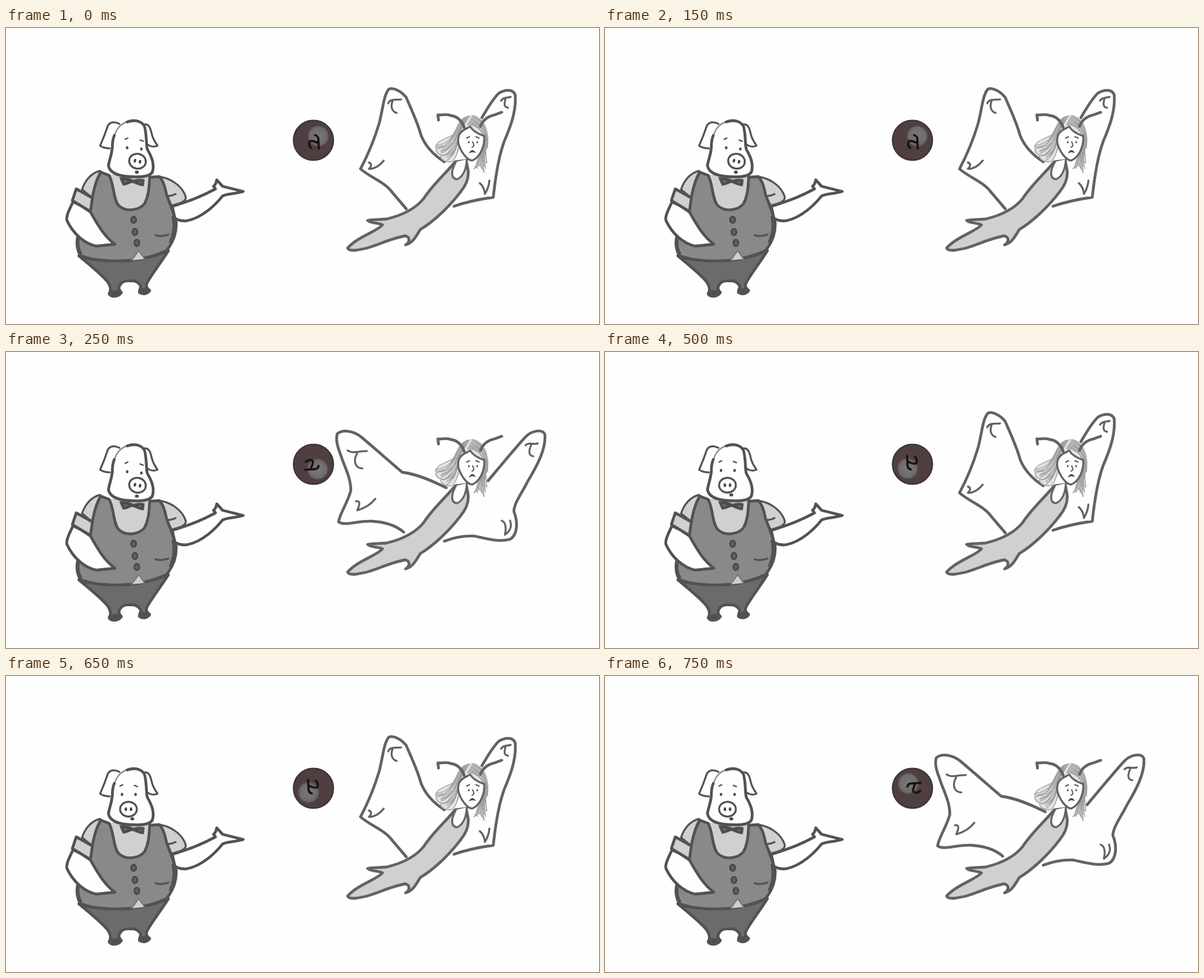
These frames come from a looping animation (920x460 px, 1000 ms). An HTML page:

```html
<!DOCTYPE html>
<html lang="en">
<head>
<meta charset="utf-8">
<title>Pig, ball and fairy</title>
<style>
  html, body { margin: 0; width: 100%; height: 100%; overflow: hidden; background: #fefefe; }
  svg { display: block; width: 920px; height: 460px; }
  path, ellipse, circle { stroke-linecap: round; stroke-linejoin: round; }
  .ink { fill: none; stroke: #535154; stroke-width: 4.3; }
  .white { fill: #fefefe; }
  .light { fill: #d0d0d0; }
  .vest { fill: #8b8988; }
  .dark { fill: #6c6b6c; }
  .solid { fill: #4b494b; }
  .mid { stroke-width: 3; }
  .thin { stroke-width: 2; }
  .fairy .ink { stroke: #636163; }
  .hair { fill: none; stroke: #a0a0a0; stroke-width: 1.3; }
</style>
</head>
<body>
<svg viewBox="0 0 920 460">
  <g id="pig" class="ink">
    <path class="dark" d="M113 354C126 365 150 384 158 395C164 404 162 410 160 413C163 419 175 418 179 411C176 408 174 405 176 401C178 395 185 392 193 393C201 392 206 396 209 401C209 406 206 408 207 411C213 415 220 413 223 408C218 405 216 400 220 394C228 380 240 365 252 346C225 358 190 364 150 361C135 360 122 358 113 354Z"/>
    <path class="solid" d="M161 411Q170 408 178 410Q175 417 165 416ZM208 408Q215 404 222 407Q218 413 209 411Z"/>
    <path class="light mid" d="M146 222C132 225 122 238 118 251L134 264L145 245Z"/>
    <path class="light mid" d="M232 231C252 230 274 245 279 263C279 271 267 273 257 276L245 252Z"/>
    <path class="white" d="M258 277C263 276 270 273 277 271C295 265 314 256 325 250L322 246C326 243 326 240 327 236L336 246L368 254C355 258 345 257 336 261C325 275 305 294 283 299C275 301 268 299 262 296Z"/>
    <path class="mid" d="M252 261Q258 261 263 258"/>
    <path class="light" stroke="none" d="M160 228H224L224 270L192 285L165 268Z"/>
    <path class="vest" d="M147 224C139 237 134 257 131 284L113 319C109 335 110 346 116 354C135 361 165 364 195 361C220 358 238 351 249 346C258 335 265 320 264 302C260 287 255 274 249 259C247 247 244 237 238 231L223 232C222 245 222 260 215 273C207 283 187 287 175 276C166 267 168 243 160 229Z"/>
    <path stroke-width="6" d="M260 294Q264 313 256 332M112 324Q109 340 115 350"/>
    <path class="white" d="M104 270C98 283 92 294 95 300C104 319 121 335 140 339L169 336C154 325 145 311 131 286L116 276Z"/>
    <path class="light" d="M109 250L134 264L131 285L103 268Z"/>
    <path class="light" stroke="none" d="M195 361L206 346L215 359Z"/>
    <path class="thin" stroke="#777" d="M195 361L206 346L215 359"/>
    <path class="mid" d="M232 322Q240 325 252 321"/>
    <g fill="#605e60" stroke="#484648" stroke-width="2.500">
      <ellipse cx="198" cy="298" rx="4" ry="5"/>
      <ellipse cx="200" cy="317" rx="4" ry="5"/>
      <ellipse cx="203" cy="334" rx="4" ry="5"/>
    </g>
    <g class="white">
      <path class="mid" d="M176 149C168 145 161 146 158 152C154 164 150 174 146 183Q152 187 161 187"/>
      <path class="mid" d="M214 150C222 148 224 156 226 164C228 174 233 179 235 183Q226 187 217 179"/>
      <path stroke="none" d="M165 185C165 164 172 149 186 146C200 141 214 145 216 158C219 175 217 186 220 190C226 200 231 212 227 224C222 232 205 232 192 231C175 230 161 225 159 214C160 205 164 198 165 185Z"/>
    </g>
    <path class="thin" stroke="#858385" d="M168 169C171 155 180 148 190 145"/>
    <path d="M188 146C202 141 215 146 216 158C219 175 217 186 220 190C226 200 231 212 227 224C222 232 205 232 192 231C175 230 161 225 159 214C160 205 164 198 165 185Q165 174 168 167"/>
    <path class="solid thin" d="M177 233L182 244Q190 243 196 239Q204 244 213 245L214 236Q205 234 198 237Q188 232 177 233Z"/>
    <path class="dark" stroke="none" d="M182 236L190 238L184 241ZM204 239L211 238L210 242Z"/>
  </g>
  <g id="face"></g>

  <g id="ball">
    <circle cx="477" cy="174.500" r="31" fill="#503f40" stroke="#3a3234" stroke-width="2"/>
    <circle cx="470.500" cy="167" r="17" fill="url(#shine)"/>
    <path fill="none" stroke="#151315" stroke-width="3.300" d="M469 172C471 164 479 168 490 166M481 168C479 173 475 181 481 181Q486 182 489 178"/>
  </g>
  <radialGradient id="shine">
    <stop offset="0" stop-color="#7b7878"/>
    <stop offset=".8" stop-color="#6f6b6b"/>
    <stop offset="1" stop-color="#503f40"/>
  </radialGradient>

  <g class="fairy">
    <path id="wings" class="ink"/>
    <path id="marks" class="ink mid"/>
    <path class="ink light" d="M697 208C680 228 660 246 648 265C636 280 615 291 590 297C578 298 569 297 561 299C565 304 578 302 584 306C576 316 546 324 530 342C533 349 550 344 560 342C580 336 600 326 620 323C628 326 626 333 620 337C632 334 637 322 643 313C665 300 690 275 705 255C715 243 718 232 717 222L714 206Z"/>
    <path class="ink white mid" d="M698 208C689 224 691 235 700 235C709 231 714 219 715 204"/>
    <g id="hair"></g>
    <path class="ink white mid" d="M715 156C703 161 700 169 702 180C706 193 715 205 723 206C734 202 743 186 742 168C733 165 725 161 720 153Z"/>
    <path class="ink" stroke-width="3.5" d="M711 155C708 145 700 137 690 136C682 133 676 136 670 135L671 143M736 153C740 143 748 137 758 135L769 131"/>
    <path class="ink thin" d="M715 171L719 169M729 169L734 171M724 177Q728 184 723 185"/>
    <path class="solid" d="M717 176h2v3h-2zM730 176h2v3h-2zM718 195Q723 185 729 194L723 193Z"/>
  </g>
</svg>
<script>
const get = id => document.getElementById(id);

const raised = {
  wings: `M680 208C660 195 650 182 644 167C638 145 628 125 621 108C613 98 601 92 594 95C586 104 585 125 579 148
    C571 175 560 200 550 219C565 232 588 240 598 254L621 281
    M738 140C745 128 755 110 765 101C775 95 787 95 790 104C792 130 782 155 773 176C766 195 760 225 756 263C735 266 715 270 695 277`,
  marks: `M593 117C596 110 604 112 613 111M600 113C596 122 599 130 606 132M563 209Q570 212 563 219Q576 219 586 206
    M768 113C772 107 777 109 783 107M775 109C773 117 772 123 779 124M735 241Q742 247 743 258Q749 248 750 237`
};
const spread = {
  wings: `M683 211C665 202 640 190 615 187C595 170 570 148 551 132C538 122 522 120 514 127C510 140 518 155 522 168
    C530 188 535 200 535 215C530 235 518 250 516 264C525 271 545 262 568 263Q600 265 617 280
    M748 200C765 180 785 155 805 133C815 122 832 119 836 128C838 150 825 175 810 200C800 220 788 235 788 248
    C795 265 793 285 782 291C765 296 745 290 727 286Q703 285 680 294`,
  marks: `M530 153C538 159 548 153 560 154M545 157C539 168 540 180 553 181M543 232Q552 230 545 246Q563 241 573 228
    M806 145C812 139 818 145 825 142M815 144C811 153 810 161 818 162M769 262Q778 266 774 284Q787 275 782 262`
};

// The eyes, snout and mouth shift together as the pig follows the wings.
function pigFace(eyeL, eyeR, snout, mouth, tilt) {
  const dot = ([x, y], rx, ry) => `<ellipse class="solid" cx="${x}" cy="${y}" rx="${rx}" ry="${ry}"/>`;
  return dot(eyeL, 2, 2.5) + dot(eyeR, 2, 2.5) + dot(mouth, 3, 2.5) +
    `<path class="ink thin" d="M${eyeL[0] - 3} ${eyeL[1] - 13}l4 -2M${eyeR[0] - 2} ${eyeR[1] - 14}l5 2"/>
    <g transform="translate(${snout}) rotate(${tilt})">
      <ellipse class="ink white mid" rx="13" ry="11.5"/>${dot([-4, 0], 2, 3)}${dot([4, 0], 2, 3)}
    </g>`;
}
const faces = [
  pigFace([188, 186], [210, 188], [204, 207], [203, 224], 12),
  pigFace([180, 184], [201, 184], [190, 207], [196, 222], 0)
];

function drawHair() {
  let d = '';
  for (let i = 0; i < 12; i++) {
    const k = i / 11, wave = 3 * Math.sin(i * 2.4);
    d += `M${719 - 11 * k} ${137 + 18 * k}C${693 + 8 * k} ${140 + 22 * k} ${705 + wave} ${178 + 14 * k} ${667 + 22 * k + wave} ${183 + 25 * k}`;
  }
  for (let i = 0; i < 8; i++) {
    const k = i / 7, wave = 4 * Math.sin(i * 2.1);
    d += `M${716 + 8 * k} ${150 - 14 * k}C${738 + 8 * k} ${150 - 8 * k} ${743 + 6 * k} ${168 + wave} ${741 + 6 * k} 186`;
    d += `M${740 + 6 * k} 185Q${732 + 8 * k} 200 ${729 + 15 * k} ${215 + wave}`;
  }
  get('hair').innerHTML =
    `<path fill="#e2e2e2" d="M720 135C702 138 698 158 692 166C684 170 671 174 666 185Q664 195 673 198Q676 207 690 209L703 190L704 165
      L720 155L742 168L738 190L726 219L734 214L741 225L739 206L746 210L744 190L749 172C748 150 740 136 720 135Z"/>
    <path class="hair" d="${d}"/>
    <path class="hair" stroke-width="2" d="M697 164C686 172 671 172 666 185Q682 190 699 172M667 188Q668 198 680 198Q694 196 701 180M674 199Q676 208 690 208
      M740 187Q736 205 726 219L737 211L742 225L739 205L746 210L744 188"/>`;
}
drawHair();

let shown = -1;
function draw(now) {
  const step = Math.floor(now % 1000 / 250);
  if (step !== shown) {
    shown = step;
    const pose = step % 2 ? spread : raised;
    get('wings').setAttribute('d', pose.wings);
    get('marks').setAttribute('d', pose.marks);
    get('face').innerHTML = faces[step >> 1];
    get('ball').setAttribute('transform', `rotate(${90 * (step + 1)} 477 174.5)`);
  }
  requestAnimationFrame(time => draw(Math.max(0, time - start)));
}
const start = performance.now();
draw(0);
</script>
</body>
</html>
```
